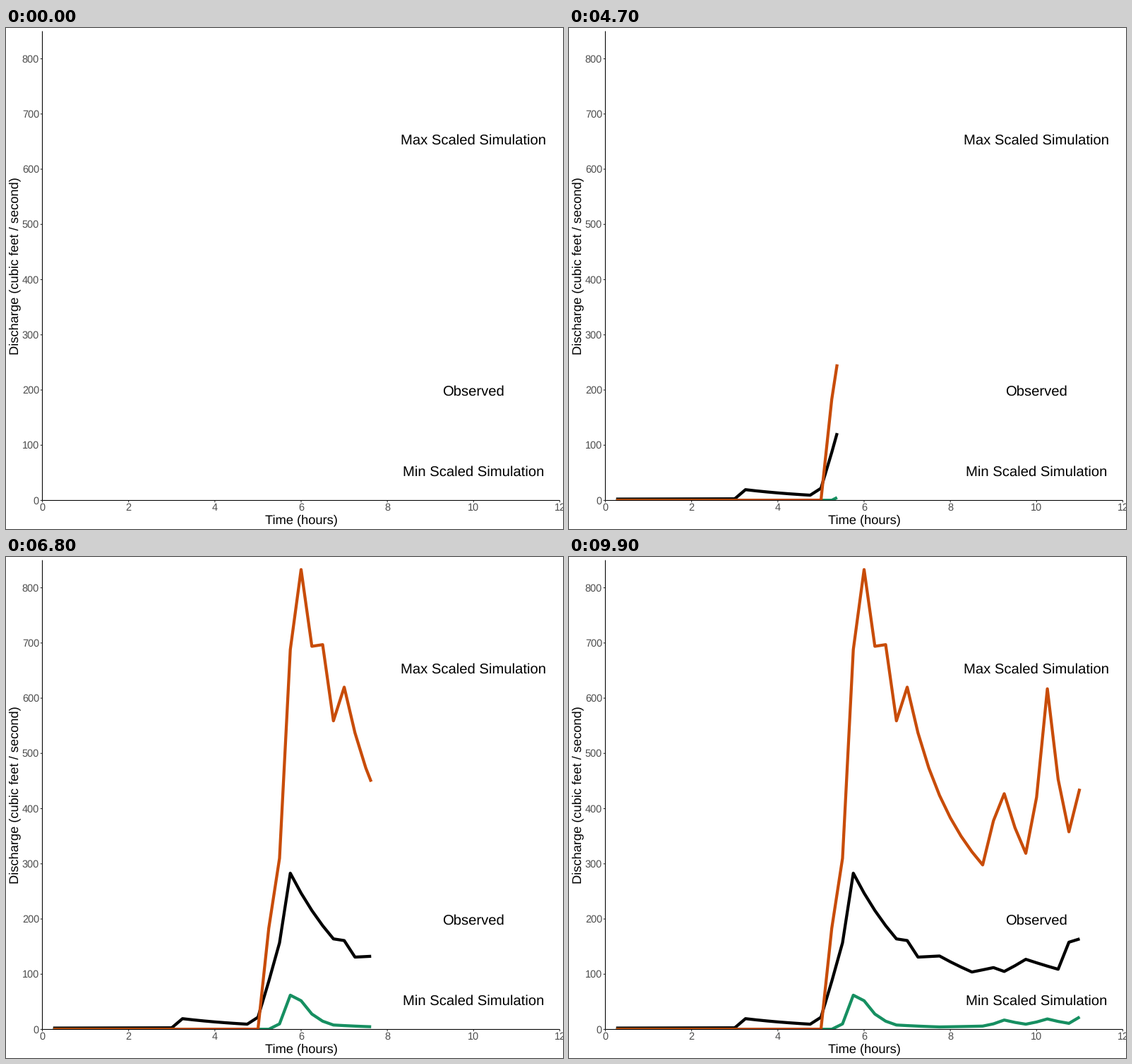
Animation, 789 px wide and 710 px high, one loop 10000 ms. Source, as a matplotlib script:

```python
import numpy as np
import matplotlib.pyplot as plt
from matplotlib.animation import FuncAnimation
from matplotlib.patches import Rectangle

W, H, DPI = 789, 710, 72          # 72 dpi: one point is one pixel
FRAMES, INTERVAL = 100, 100
LEFT, RIGHT, TOP, BOTTOM = 51.5, 784.5, 4.5, 669.5

plt.rcParams["font.family"] = "Liberation Sans"
plt.rcParams["text.hinting"] = "none"

hours = np.arange(0.25, 11.01, 0.25)
steps = np.arange(len(hours))
# Each sample lands on a whole frame; the tip moves linearly in between
arrival = np.round(steps * (FRAMES - 1) / steps[-1])


def px(t):
    return LEFT + np.asarray(t) * (RIGHT - LEFT) / 12


def py(flow):
    return BOTTOM - np.asarray(flow) * (BOTTOM - TOP) / 850


def hydrograph(turns, scale, unscale):
    """Quarter-hour flow, straight in scaled space between turning points."""
    level = scale(np.array(list(turns.values()), float))
    return unscale(np.interp(hours, list(turns), level))


# Exponential recession for the small flows, hyperbolic for the flood
observed = hydrograph(
    {0.25: 2.4, 3: 2.9, 3.25: 19.5, 4.75: 9.5, 5: 22, 5.25: 87, 5.75: 283,
     6.75: 164, 7: 161, 7.25: 131, 7.75: 133, 8.5: 104, 9: 112, 9.25: 105,
     9.75: 127, 10.5: 109, 10.75: 158, 11: 164}, np.log, np.exp)
low = hydrograph(
    {0.25: 0.1, 5.25: 0.3, 5.5: 10, 5.75: 62, 6: 52, 6.75: 8, 7.75: 4.5,
     8.75: 6, 9.25: 17, 9.75: 9.5, 10.25: 19, 10.75: 11, 11: 22.5},
    np.log, np.exp)
high = hydrograph(
    {0.25: 0.2, 5: 0.5, 5.25: 183, 5.5: 310, 5.75: 688, 6: 833, 6.25: 694,
     6.5: 697, 6.75: 559, 7: 620, 8.75: 298, 9: 378, 9.25: 427, 9.75: 319,
     10.25: 617, 10.75: 358, 11: 436}, np.reciprocal, np.reciprocal)

fig = plt.figure(figsize=(W / DPI, H / DPI), dpi=DPI, facecolor="white")
ax = fig.add_axes([0, 0, 1, 1])
ax.set(xlim=(0, W), ylim=(H, 0))
ax.axis("off")


def label(x, y, text, size, color="black", ha="center", rotation=0):
    ax.text(x, y, text, size=size, color=color, ha=ha, va="baseline",
            rotation=rotation, rotation_mode="anchor")


def rule(x, y, color, zorder):
    ax.plot(x, y, color=color, lw=1.07, zorder=zorder, snap=False,
            solid_capstyle="butt")


panel = Rectangle((LEFT, TOP), RIGHT - LEFT, BOTTOM - TOP,
                  transform=ax.transData)
curves = []
for flow, color in ((observed, "black"), (low, "#168f61"),
                    (high, "#c84c09")):
    line, = ax.plot([], [], color=color, lw=4.27, zorder=2,
                    solid_capstyle="butt", solid_joinstyle="round")
    line.set_clip_path(panel)
    curves.append((line, flow))

for t in range(0, 13, 2):
    rule([px(t)] * 2, [BOTTOM, BOTTOM + 2.75], "#333333", 3)
    label(px(t), 684, str(t), 14.5, "#4d4d4d")
for q in range(0, 801, 100):
    rule([LEFT - 2.75, LEFT], [py(q)] * 2, "#333333", 3)
    label(47, py(q) + 5, str(q), 14.5, "#4d4d4d", ha="right")
rule([LEFT, LEFT], [TOP, BOTTOM], "black", 4)
rule([LEFT, RIGHT], [BOTTOM, BOTTOM], "black", 4)

label((LEFT + RIGHT) / 2, 702, "Time (hours)", 18.2)
label(17, (TOP + BOTTOM) / 2, "Discharge (cubic feet / second)", 18.2,
      rotation=90)
for q, text in ((655, "Max Scaled Simulation"), (200, "Observed"),
                (55, "Min Scaled Simulation")):
    label(px(10), py(q) + 8, text, 20.25)


def draw(frame):
    tip = np.interp(frame, arrival, steps)
    shown = np.append(steps[steps < tip], tip)
    x = px(np.interp(shown, steps, hours))
    for line, flow in curves:
        line.set_data(x, py(np.interp(shown, steps, flow)))
    return [line for line, _ in curves]


anim = FuncAnimation(fig, draw, frames=FRAMES, interval=INTERVAL,
                     repeat=True, repeat_delay=0, blit=False)
plt.show()
```
